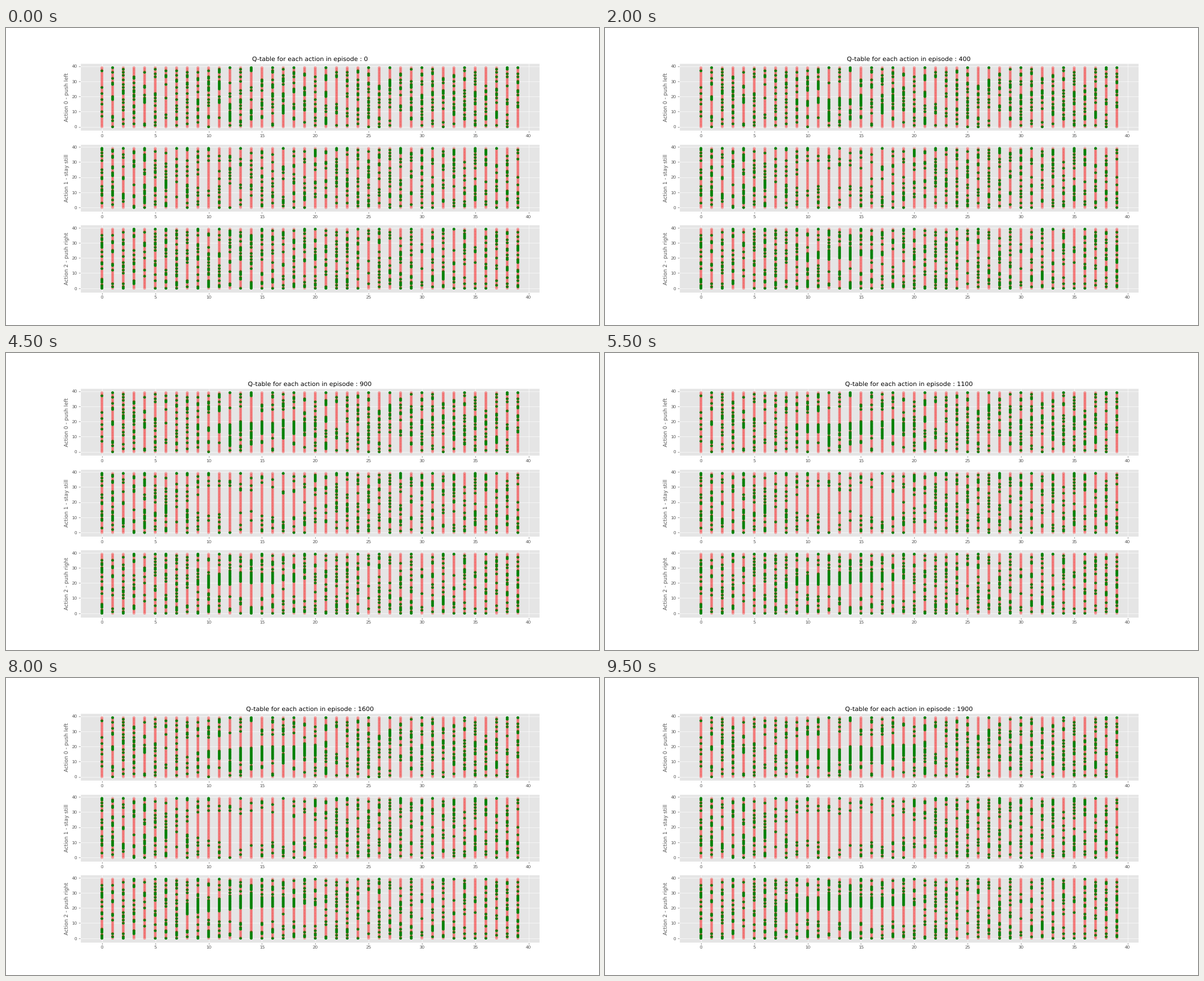
These frames come from a looping animation (988x495 px, 10 s). A matplotlib script:

```python
import matplotlib.pyplot as plt
import numpy as np
from matplotlib.animation import FuncAnimation

SIZE = 40
FRAMES = 20
EPISODES_PER_FRAME = 100
LABELS = ("push left", "stay still", "push right")
LEFT, STILL, RIGHT = range(3)

GREEN = (0, 0.5, 0, 1.0)
RED = (1, 0, 0, 0.3)

# Valley floor at rest: the states around it are learned first.
REST_POSITION, REST_VELOCITY = 14.2, 19.5
POSITION_REACH, VELOCITY_REACH = 7.4, 9.2

columns, rows = np.divmod(np.arange(SIZE * SIZE), SIZE)
rng = np.random.default_rng(4)
untrained = rng.integers(0, 3, SIZE * SIZE)
roughness = rng.normal(0, 0.06, SIZE * SIZE)
stubbornness = rng.random(SIZE * SIZE)


def policy(frame):
    """Best action of every state, ordered by position and then velocity."""
    progress = (frame / (FRAMES - 1)) ** 0.25
    distance = np.hypot((columns - REST_POSITION) / POSITION_REACH,
                        (rows - REST_VELOCITY) / VELOCITY_REACH)
    learned = distance + roughness < progress
    learned &= stubbornness < 0.65 + 0.35 * progress

    # Push along with the motion, with a dividing line that wavers.
    waver = np.random.default_rng(frame).normal(0, 0.6, SIZE)
    divide = REST_VELOCITY + 0.45 * (columns - REST_POSITION) + waver[columns]
    trained = np.where(rows < divide, LEFT, RIGHT)
    return np.where(learned, trained, untrained)


plt.style.use("ggplot")
plt.rcParams["text.hinting"] = "none"
fig, axes = plt.subplots(3, 1, figsize=(19, 9.52), dpi=52)
scatters = []
for action, (ax, label) in enumerate(zip(axes, LABELS)):
    scatters.append(ax.scatter(columns, rows, color=[RED] * len(rows), marker="o"))
    ax.set_xlim(-2.045, 41.045)
    ax.set_ylim(-2.7, 41.7)
    ax.set_xticks(range(0, 41, 5))
    ax.set_yticks(range(0, 41, 10))
    ax.set_ylabel(f"Action {action} - {label}")
title = axes[0].set_title("")


def update(frame):
    best = policy(frame)
    for action, scatter in enumerate(scatters):
        scatter.set_color(np.where((best == action)[:, None], GREEN, RED))
    title.set_text(f"Q-table for each action in episode : {frame * EPISODES_PER_FRAME}")
    return [*scatters, title]


animation = FuncAnimation(fig, update, frames=FRAMES, interval=500,
                          repeat=True, repeat_delay=0, blit=False)
plt.show()
```
